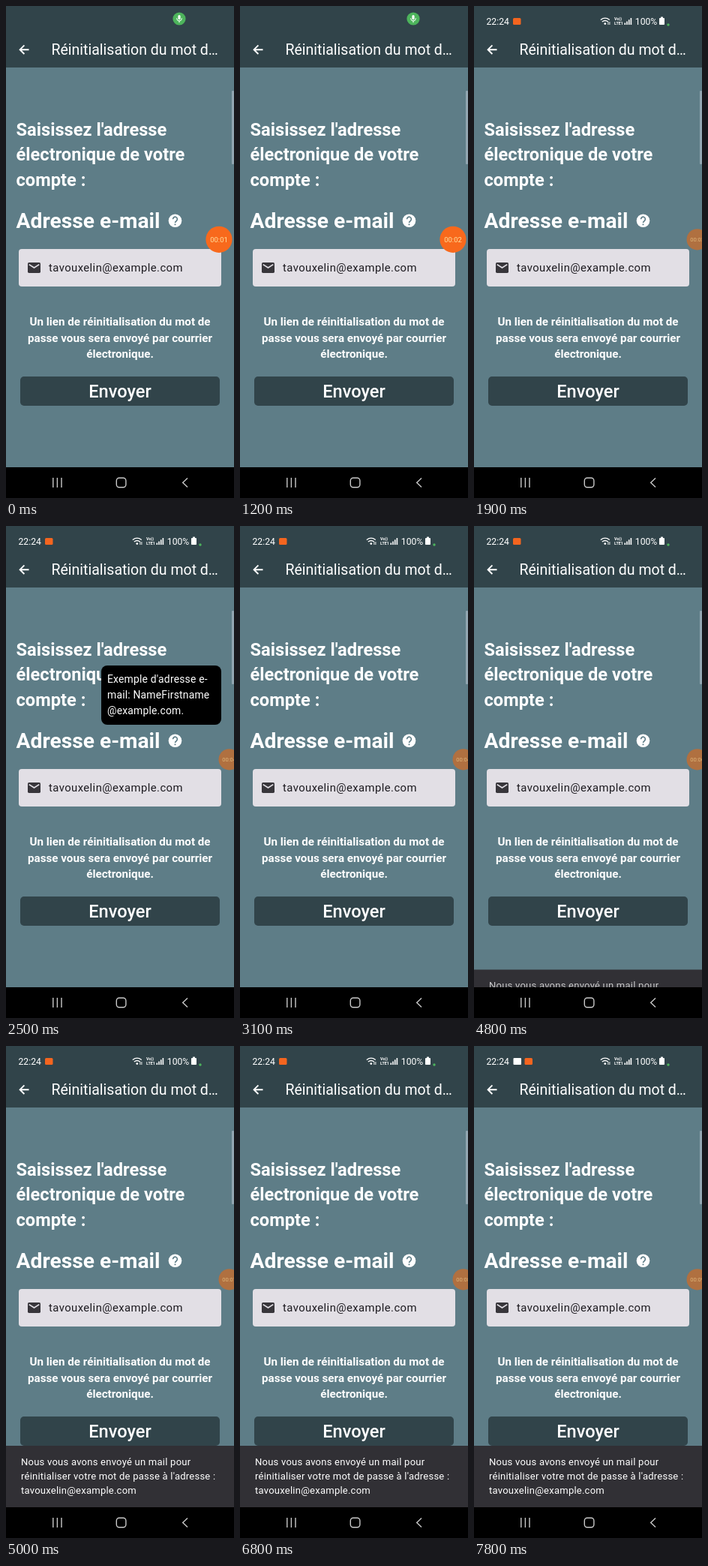
An HTML page that plays this animation: 304x656 px, repeating every 8000 ms.

```html
<!DOCTYPE html>
<html lang="fr">
<head>
<meta charset="utf-8">
<title>Réinitialisation du mot de passe</title>
<style>
  html, body { margin: 0; width: 100%; height: 100%; overflow: hidden; background: #000; }
  svg { display: block; width: 100%; height: 100%; font-family: Roboto, sans-serif; fill: #fff; }
  .heading { font-weight: 700; font-size: 23.65px; }
  .label { font-weight: 700; font-size: 28.2px; }
  .note { font-weight: 700; font-size: 15.2px; text-anchor: middle; }
  .button { font-weight: 500; font-size: 23.6px; text-anchor: middle; }
  .email { font-size: 14.85px; letter-spacing: .42px; fill: #1d1b20; }
  .tip { font-size: 13.9px; letter-spacing: .2px; }
  .snack { font-size: 13.05px; letter-spacing: .22px; }
  .line { fill: none; stroke: #fff; }
</style>
</head>
<body>
<svg viewBox="0 0 304 656" preserveAspectRatio="none">
  <rect width="304" height="656" fill="#5e7d87"/>
  <rect width="304" height="82" fill="#31444a"/>
  <rect x="301" y="113" width="3" height="98" rx="1" fill="#92a6b1"/>

  <!-- app bar -->
  <path class="line" stroke-width="1.9" d="M30.5 58.2H18.6M24.4 52.4l-5.8 5.8 5.8 5.8"/>
  <text x="60.5" y="65.3" font-size="19.5">Réinitialisation du mot d…</text>

  <!-- form -->
  <g class="heading">
    <text x="13.5" y="172.7">Saisissez l'adresse</text>
    <text x="13.5" y="206.2">électronique de votre</text>
    <text x="13.5" y="239.7">compte :</text>
  </g>
  <text class="label" x="13.5" y="296">Adresse e-mail</text>
  <circle cx="225.5" cy="286.3" r="8.8"/>
  <path d="M222.6 284.2a2.9 2.9 0 1 1 4.8 2.1q-1.9 1.5-1.9 2.8" fill="none" stroke="#5e7d87" stroke-width="1.7"/>
  <rect x="224.6" y="290.4" width="1.8" height="1.8" fill="#5e7d87"/>
  <rect x="17" y="324" width="270" height="50" rx="4" fill="#e2dfe5"/>
  <rect x="29" y="342" width="17" height="14" rx="1.7" fill="#38363b"/>
  <path d="M30.7 344.6l6.8 4.4 6.8-4.4" fill="none" stroke="#e2dfe5" stroke-width="1.7"/>
  <text class="email" x="57" y="354">tavouxelin@example.com</text>
  <g class="note">
    <text x="152" y="426.2">Un lien de réinitialisation du mot de</text>
    <text x="152" y="447.8">passe vous sera envoyé par courrier</text>
    <text x="152" y="469.3">électronique.</text>
  </g>
  <rect id="button" x="19" y="494" width="266" height="39" rx="5"/>
  <text class="button" x="152" y="522">Envoyer</text>
  <path id="spinner" class="line" stroke-width="3.4"/>

  <g id="tip" class="tip">
    <rect x="127" y="186" width="160" height="79" rx="8" fill="#000"/>
    <text x="135" y="209">Exemple d'adresse e-</text>
    <text x="135" y="230">mail: NameFirstname</text>
    <text x="135" y="250.5">@example.com.</text>
  </g>

  <g id="snack" class="snack">
    <rect y="533" width="304" height="83" fill="#313035"/>
    <g id="snackText">
      <text x="20" y="558.5">Nous vous avons envoyé un mail pour</text>
      <text x="20" y="577.5">réinitialiser votre mot de passe à l'adresse :</text>
      <text x="20" y="597">tavouxelin@example.com</text>
    </g>
  </g>

  <!-- navigation bar -->
  <rect y="615" width="304" height="41" fill="#000"/>
  <g class="line" style="stroke:#c8c8c8" stroke-width="1.4">
    <path d="M62.8 629v13M68.4 629v13M74 629v13M242 629.5l-6.3 6 6.3 6"/>
    <rect x="147.3" y="629.3" width="12.6" height="12.4" rx="3.6"/>
  </g>

  <!-- status bar -->
  <g id="status">
    <text x="16.5" y="24.8" font-size="12.2">22:24</text>
    <rect id="mailMark" x="52.5" y="16" width="10.5" height="9" rx="1"/>
    <rect id="recorder" x="52" y="16" width="10.5" height="9" rx="1.5" fill="#f4651f"/>
    <g class="line" stroke-width="1.3">
      <path d="M168.8 18.5q6-4.6 12 0M170.8 21q4-3 8 0"/>
      <path d="M178.9 21v4M180.9 21v4" stroke-width=".9"/>
    </g>
    <circle cx="174.8" cy="23.6" r="1.4"/>
    <g font-size="5.4" font-weight="700">
      <text x="187" y="19.3">Vo))</text>
      <text x="187" y="25">LTE1</text>
    </g>
    <path d="M200.5 25v-2.5h1.6V25zM203.2 25v-4.6h1.6V25zM205.9 25v-6.8h1.6V25zM208.6 25v-9h1.6v9z"/>
    <text x="214.8" y="24.8" font-size="12.2">100%</text>
    <path d="M249 14.5h3V16h1.2q.8 0 .8.8v7.4q0 .8-.8.8h-5.4q-.8 0-.8-.8v-7.4q0-.8.8-.8h1.2z"/>
  </g>
  <g id="chip">
    <circle r="8.6" fill="#4db45c"/>
    <g id="mic">
      <rect x="-1.6" y="-5" width="3.2" height="6.2" rx="1.6"/>
      <path class="line" stroke-width="1" d="M-3.3-1v.6a3.3 3.3 0 0 0 6.6 0V-1M0 3v2.2"/>
    </g>
  </g>

  <!-- recording bubble -->
  <g id="bubble">
    <circle id="disc" r="17.6"/>
    <text id="timer" y="3.3" font-size="9.4" text-anchor="middle" fill="#ffe3a0"></text>
  </g>
</svg>
<script>
  const LOOP = 8000;
  const el = Object.fromEntries([...document.querySelectorAll('[id]')].map(e => [e.id, e]));
  const set = (name, attrs) => {
    for (const key in attrs) el[name].setAttribute(key, attrs[key]);
  };

  // Piecewise linear value through [time, value] steps.
  function at(t, ...steps) {
    if (t <= steps[0][0]) return steps[0][1];
    for (let i = 1; i < steps.length; i++) {
      const [t0, v0] = steps[i - 1], [t1, v1] = steps[i];
      if (t < t1) return v0 + (v1 - v0) * (t - t0) / (t1 - t0);
    }
    return steps[steps.length - 1][1];
  }
  const smooth = p => p * p * (3 - 2 * p);
  const mix = (a, b, p) => a + (b - a) * p;
  const mixColor = (a, b, p) => `rgb(${a.map((v, i) => mix(v, b[i], p))})`;

  const ticks = [900, 1900, 2500, 3700, 4200, 5000, 6800, 7800];

  function arc(cx, cy, r, from, sweep) {
    const point = deg => {
      const a = deg * Math.PI / 180;
      return `${cx + r * Math.cos(a)} ${cy + r * Math.sin(a)}`;
    };
    return `M${point(from)}A${r} ${r} 0 ${sweep > 180 ? 1 : 0} 1 ${point(from + sweep)}`;
  }

  function render(t) {
    // Microphone chip shrinks to a dot while the status icons return.
    const shrink = smooth(at(t, [1200, 0], [1600, 1]));
    set('chip', { transform: `translate(${mix(231, 259, shrink)} ${mix(17, 25, shrink)}) scale(${mix(1, .2, shrink)})` });
    set('mic', { opacity: 1 - shrink });
    set('status', { opacity: at(t, [1300, 0], [1600, 1]) });

    const mail = at(t, [7450, 0], [7600, 1]);
    set('mailMark', { opacity: mail });
    set('recorder', { x: mix(52, 67.5, mail) });

    // Bubble docks at the edge and dims.
    const dock = smooth(at(t, [1300, 0], [1700, 1]));
    const dim = at(t, [1500, 0], [1850, 1]);
    set('bubble', { transform: `translate(${mix(284, 297.6, dock)} 311.3) scale(${mix(1, .8, dock)})` });
    set('disc', { fill: mixColor([248, 105, 28], [176, 112, 64], dim) });
    set('timer', { opacity: mix(1, .6, dim) });
    el.timer.textContent = '00:0' + (1 + ticks.filter(k => t >= k).length);

    set('tip', { opacity: at(t, [1950, 0], [2100, 1], [2850, 1], [3100, 0]) });

    const press = at(t, [3950, 0], [4150, 1], [4400, 1], [4700, 0]);
    set('button', { fill: mixColor([49, 68, 74], [60, 72, 72], press) });

    const spin = t - 4200;
    const spinning = spin >= 0 && spin < 550;
    set('spinner', {
      visibility: spinning ? 'visible' : 'hidden',
      d: spinning ? arc(152, 567, 15, 58 + spin * .23, 30 + 240 * smooth(Math.min(1, spin / 600))) : ''
    });

    set('snack', { transform: `translate(0 ${at(t, [4720, 83], [4800, 59], [4900, 10], [5000, 0])})` });
    set('snackText', { opacity: at(t, [4750, .6], [4900, 1]) });
  }

  const start = performance.now();
  function frame() {
    render((performance.now() - start) % LOOP);
    requestAnimationFrame(frame);
  }
  frame();
</script>
</body>
</html>
```
